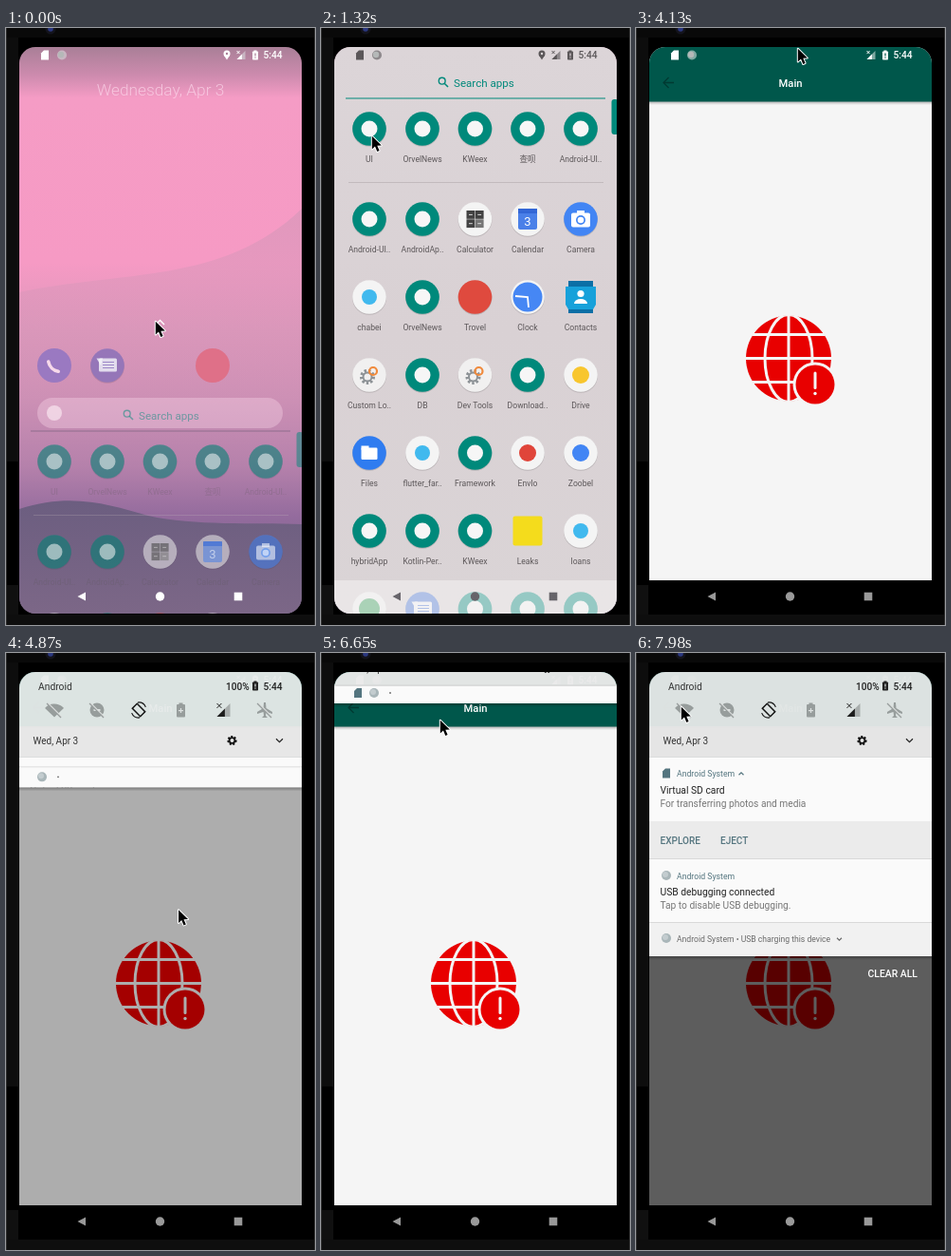
An HTML page with a canvas that plays this animation: 326x628 px, repeating every 8000 ms.

```html
<!DOCTYPE html>
<html lang="en">
<head>
<meta charset="utf-8">
<title>Phone demo</title>
<style>
html, body { margin: 0; width: 326px; height: 628px; overflow: hidden; background: #000; }
canvas { display: block; width: 326px; height: 628px; }
</style>
</head>
<body>
<canvas id="stage"></canvas>
<script>
const canvas = document.getElementById('stage');
const dpr = window.devicePixelRatio || 1;
canvas.width = 326 * dpr;
canvas.height = 628 * dpr;
const c = canvas.getContext('2d');
const LOOP = 8000, TEAL = '#00897b', GREEN = '#00574b', PAGE = '#f5f5f5', SLATE = '#54757f';

// The screen refreshes in bursts: start, end, number of steps.
const bursts = [[0, 0, 1], [150, 300, 2], [590, 1620, 8], [2070, 2940, 7], [3240, 3680, 4],
  [3980, 4130, 2], [4580, 5600, 8], [5750, 6650, 7], [6800, 7830, 8], [7980, 7980, 1]];
const ticks = bursts.flatMap(([a, b, n]) =>
  Array.from({ length: n }, (_, i) => Math.round((a + (n > 1 ? (b - a) * i / (n - 1) : 0)) / 10) * 10));

const cursorPath = [[0, 157, 308], [300, 157, 308], [590, 112, 152], [740, 87, 125], [880, 62, 115],
  [1030, 53, 113], [2070, 53, 113], [2210, 62, 128], [2940, 188, 309], [3240, 187, 290],
  [3680, 171, 28], [3980, 171, 26], [4130, 170, 21], [4580, 172, 75], [5020, 186, 370],
  [5170, 187, 398], [5460, 165, 130], [5600, 155, 45], [6200, 135, 24], [6650, 125, 70],
  [7100, 118, 320], [7240, 112, 330], [7830, 50, 57], [7980, 47, 56]];
const panelPath = [[4130, 20], [4580, 55], [5020, 186], [5170, 198], [5460, 80], [5600, 20],
  [6200, 20], [6350, 38], [6650, 53], [7100, 164], [7390, 319]];
const drawerPath = [[0, 350], [150, 120], [300, 0]];
const openPath = [[1180, 0], [1320, .35], [1470, .8], [1620, 1]];
const fadePath = [[1620, 0], [2070, .27], [2210, .62], [2360, 1]];
const navPath = [[2500, .95], [2800, .6]];

function at(path, t, col = 1) {
  if (t <= path[0][0]) return path[0][col];
  const i = path.findIndex(k => k[0] >= t);
  if (i < 0) return path[path.length - 1][col];
  const a = path[i - 1], b = path[i];
  return a[col] + (b[col] - a[col]) * (t - a[0]) / (b[0] - a[0]);
}
const clamp = (v, lo, hi) => Math.max(lo, Math.min(hi, v));

function rect(x, y, w, h, fill) { c.fillStyle = fill; c.fillRect(x, y, w, h); }
function round(x, y, w, h, r, fill) {
  c.beginPath(); c.roundRect(x, y, w, h, r); c.fillStyle = fill; c.fill();
}
function disc(x, y, r, fill) {
  c.beginPath(); c.arc(x, y, r, 0, 7); c.fillStyle = fill; c.fill();
}
function poly(fill, ...p) {
  c.beginPath();
  for (let i = 0; i < p.length; i += 2) c.lineTo(p[i], p[i + 1]);
  c.closePath(); c.fillStyle = fill; c.fill();
}
function line(color, w, ...p) {
  c.beginPath();
  for (let i = 0; i < p.length; i += 2) c.lineTo(p[i], p[i + 1]);
  c.strokeStyle = color; c.lineWidth = w; c.stroke();
}
function ring(x, y, rx, ry, color, w) {
  c.beginPath(); c.ellipse(x, y, rx, ry, 0, 0, 7); c.strokeStyle = color; c.lineWidth = w; c.stroke();
}
// y is the vertical middle of the capitals
function text(s, x, y, size, color, align = 'left', weight = 400) {
  c.font = `${weight} ${size}px Roboto, "Noto Sans CJK SC", "Noto Sans CJK", sans-serif`;
  c.textAlign = align; c.fillStyle = color; c.fillText(s, x, y + size * .355);
}
function fade(stops, y0, y1) {
  const g = c.createLinearGradient(0, y0, 0, y1);
  stops.forEach(([p, col]) => g.addColorStop(p, col));
  return g;
}
function layer(alpha, fn) { c.save(); c.globalAlpha *= alpha; fn(); c.restore(); }

function sdCard(x, y, color) { poly(color, x - 4, y - 2, x - 1, y - 5, x + 4, y - 5, x + 4, y + 5, x - 4, y + 5); }
function debugDot(x, y) { disc(x, y, 5, '#a9b6b9'); disc(x - 1, y - 1, 3, '#c3cccf'); }
function battery(x, y, color, bolt) {
  rect(x - 1.5, y - 5, 3, 1.5, color);
  round(x - 3, y - 4, 6, 9, .8, color);
  rect(x - .6, y - 2, 1.2, 3, bolt); rect(x - .6, y + 2, 1.2, 1.2, bolt);
}
function signal(x, y, s, color, dim) {
  poly(dim, x - s, y + s, x + s, y + s, x + s, y - s);
  poly(color, x - s, y + s, x + s * .2, y + s, x + s * .2, y - s * .2);
  line(color, 1, x - s, y - s, x - s * .3, y - s * .3);
  line(color, 1, x - s * .3, y - s, x - s, y - s * .3);
}
function statusBar(color, dim, bolt, pin) {
  sdCard(41, 28.5, color);
  disc(59, 28.5, 5, dim); disc(58, 28, 3.2, '#b5b8b8');
  if (pin) {
    disc(233, 27, 3.5, color);
    poly(color, 229.8, 28.5, 236.2, 28.5, 233, 33.5);
    disc(233, 27, 1.2, bolt);
  }
  signal(248, 28.5, 4.5, color, dim);
  battery(263, 28.5, color, bolt);
  text('5:44', 271.5, 28.5, 10.2, color, 'left', 500);
}
function navKeys(color) {
  poly(color, 75.5, 598, 84, 593.5, 84, 602.5);
  disc(162.5, 598, 4.7, color);
  rect(240.7, 593.7, 8.6, 8.6, color);
}
function magnifier(x, y, color) {
  ring(x - 1.3, y - 1.3, 3.4, 3.4, color, 1.4);
  line(color, 1.6, x + 1.2, y + 1.2, x + 5, y + 5);
}

function plate(x, y, color) {
  disc(x, y + .8, 18, 'rgba(0,0,0,.14)');
  disc(x, y, 17.8, color);
}
const dotted = (base, dot, r) => (x, y) => { plate(x, y, base); disc(x, y, r, dot); };
function gear(x, y) {
  plate(x, y, '#f1f0f0');
  c.setLineDash([2.4, 2]); ring(x - 2, y + 2, 6.5, 6.5, '#8d9296', 3); c.setLineDash([]);
  ring(x - 2, y + 2, 4.5, 4.5, '#8d9296', 2);
  ring(x + 4, y - 4, 4, 4, '#f08a3c', 2.2);
}
function bubble(x, y, color, ink) {
  plate(x, y, color);
  round(x - 9, y - 7.5, 19, 14, 1.5, '#f5f5fa');
  poly('#f5f5fa', x - 11.5, y - 7.5, x - 5, y - 7.5, x - 7, y);
  for (const d of [-3.5, -.5, 2.5]) line(ink, 1.2, x - 5, y + d, x + 7, y + d);
}
const icons = {
  app: dotted(TEAL, '#f6f6f6', 8.5),
  blue: dotted('#f4f4f4', '#41b9ee', 8),
  web: (x, y) => plate(x, y, '#df4a3e'),
  vault: dotted('#f4f4f4', '#f8c62e', 9),
  mail: dotted('#f4f4f4', '#e0453a', 9),
  find: dotted('#f4f4f4', '#4285f4', 9),
  map: dotted('#f4f4f4', '#34a25a', 11),
  leak: (x, y) => round(x - 15.5, y - 15.5, 31, 31, 2, '#f4dc1c'),
  gear,
  chat: (x, y) => bubble(x, y, '#4a77d8', '#4a77d8'),
  calc(x, y) {
    plate(x, y, '#f4f4f4');
    for (const [i, j] of [[0, 0], [1, 0], [0, 1], [1, 1]]) {
      const px = x - 9 + i * 9.3, py = y - 9 + j * 9.3;
      rect(px, py, 8.8, 8.8, i && j ? '#757575' : '#424242');
      line('#ddd', 1, px + 2.5, py + 4.4, px + 6.3, py + 4.4);
    }
  },
  cal(x, y) {
    plate(x, y, '#f4f4f4');
    round(x - 10, y - 11, 20, 22, 2, '#4a80e8');
    rect(x - 10, y - 11, 20, 5, '#3367d6');
    text('3', x, y + 2, 13, '#fff', 'center');
  },
  cam(x, y) {
    plate(x, y, '#4285f4');
    round(x - 10, y - 6.5, 20, 15, 2, '#fff');
    rect(x - 4, y - 9, 8, 4, '#fff');
    disc(x, y + 1, 5, '#4285f4'); disc(x, y + 1, 3.3, '#fff');
  },
  clock(x, y) {
    plate(x, y, '#f4f4f4'); disc(x, y, 15.5, '#4687f4');
    line('#fff', 1.8, x - 13, y - 1, x, y, x + 1, y + 11);
  },
  card(x, y) {
    rect(x - 13, y - 17, 26, 34, '#0b6fa6');
    poly('#17a1da', x - 16, y - 11, x + 16, y - 11, x + 16, y + 8, x + 13, y + 13, x - 13, y + 13, x - 16, y + 8);
    disc(x, y - 3.5, 3.6, '#fff');
    c.beginPath(); c.ellipse(x, y + 7, 7, 5, 0, Math.PI, 0); c.fillStyle = '#fff'; c.fill();
  },
  files(x, y) {
    plate(x, y, '#2f7cf0');
    rect(x - 8.5, y - 7.5, 8, 4, '#fff'); round(x - 8.5, y - 5.5, 17, 12.5, 1.2, '#fff');
  }
};

const cols = [51, 107, 162.5, 218, 274];
const rows = [
  [106, 'app UI', 'app OrvelNews', 'app KWeex', 'app 查呗', 'app Android-UI..'],
  [201, 'app Android-UI..', 'app AndroidAp..', 'calc Calculator', 'cal Calendar', 'cam Camera'],
  [283, 'blue chabei', 'app OrvelNews', 'web Trovel', 'clock Clock', 'card Contacts'],
  [365, 'gear Custom Lo..', 'app DB', 'gear Dev Tools', 'app Download..', 'vault Drive'],
  [447, 'files Files', 'blue flutter_far..', 'app Framework', 'mail Envlo', 'find Zoobel'],
  [529, 'app hybridApp', 'app Kotlin-Per..', 'app KWeex', 'leak Leaks', 'blue loans'],
  [611, 'map', 'chat', 'app', 'app', 'app']
];

function wallpaper() {
  rect(14, 20, 298, 596, fade([[0, '#a97f97'], [.05, '#cd8bae'], [.09, '#f59cc5'], [.38, '#f69ac4'],
    [.5, '#dd97bb'], [.62, '#cd90b5'], [.74, '#b581ab'], [.83, '#936b9d'], [1, '#74637f']], 20, 616));
  c.beginPath(); c.moveTo(14, 278);
  c.bezierCurveTo(120, 255, 230, 270, 312, 190);
  c.lineTo(312, 400); c.lineTo(14, 400);
  c.fillStyle = fade([[0, 'rgba(205,150,182,.5)'], [1, 'rgba(205,150,182,0)']], 200, 400); c.fill();
  c.beginPath(); c.moveTo(14, 506);
  c.bezierCurveTo(70, 488, 110, 502, 150, 513);
  c.bezierCurveTo(200, 524, 260, 520, 312, 522);
  c.lineTo(312, 616); c.lineTo(14, 616);
  c.fillStyle = fade([[0, '#6c5e80'], [1, '#7c6787']], 500, 616); c.fill();
}
function home(dy) {
  text('Wednesday, Apr 3', 163, 65, 17.3, 'rgba(255,226,242,.62)', 'center', 300);
  c.save(); c.translate(0, dy);
  line('#fff', 1.3, 158, 312, 162.5, 307.5, 167, 312);
  disc(51, 355, 18, '#9a79c1');
  c.beginPath(); c.arc(57.5, 348.5, 13, 1.75, 2.95); c.lineCap = 'round';
  c.strokeStyle = '#f7d9ea'; c.lineWidth = 3.6; c.stroke(); c.lineCap = 'butt';
  layer(.8, () => bubble(107, 355, '#8d73be', '#8d73be'));
  disc(218, 355, 18, '#df7088');
  round(33, 389, 259, 32, 16, 'rgba(255,225,238,.32)');
  disc(51, 405, 8, 'rgba(255,240,247,.6)');
  c.restore();
}
function drawer(dy) {
  const p = 1 - dy / 350;
  layer(p, () => rect(14, 20, 298, 596, fade([[0, '#dcd5d8'], [.5, '#d9d1d4'], [1, '#dad4d6']], 20, 616)));
  const soft = .25 + .75 * p;
  c.save(); c.translate(0, dy);
  layer(.5 + .5 * p, () => {
    magnifier(129, 57, TEAL);
    text('Search apps', 140, 57.5, 11.6, TEAL);
    rect(26, 73.5, 274, 1, p < .3 ? '#5b5268' : TEAL);
    c.beginPath(); c.roundRect(306.5, 75, 7, 37, 3); c.fillStyle = TEAL; c.fill();
  });
  layer(soft, () => rect(29, 162, 269, 1, '#c2babd'));
  for (const [y, ...apps] of rows) apps.forEach((app, i) => {
    const [kind, ...name] = app.split(' ');
    layer(.55 + .45 * p, () => icons[kind](cols[i], y));
    layer(soft, () => text(name.join(' '), cols[i], y + 32, 8.6, '#5c5759', 'center'));
  });
  c.restore();
  layer(p, () => rect(14, 581, 298, 35, 'rgba(243,240,241,.62)'));
  const dark = p > .6;
  statusBar(dark ? '#5b5759' : '#fff', dark ? '#8d888b' : '#c9b6c2', dark ? '#dcd5d8' : '#a97f97', true);
  navKeys(dark ? '#67646a' : '#fff');
}

function globe() {
  disc(161, 347.5, 45, '#e80000');
  c.save();
  c.beginPath(); c.arc(161, 347.5, 45.5, 0, 7); c.clip();
  line(PAGE, 3, 161, 300, 161, 395);
  for (const y of [322.5, 347.5, 372.5]) line(PAGE, 3, 114, y, 208, y);
  ring(161, 347.5, 25, 46, PAGE, 3);
  c.restore();
  disc(189, 375, 23.5, PAGE);
  disc(189, 375, 20.5, '#e80000');
  c.lineCap = 'round'; line(PAGE, 3, 189, 363, 189, 378.5); c.lineCap = 'butt';
  disc(189, 384.5, 1.7, PAGE);
}
function appPage(t) {
  rect(14, 20, 298, 561, PAGE);
  rect(14, 77, 298, 4, fade([[0, 'rgba(0,0,0,.3)'], [1, 'rgba(0,0,0,0)']], 77, 81));
  rect(14, 37, 298, 40.5, GREEN);
  line('#003a32', 1.3, 40, 57.5, 29, 57.5);
  line('#003a32', 1.3, 34.5, 52, 29, 57.5, 34.5, 63);
  text('Main', 163, 58, 11.2, '#fff', 'center', 500);
  globe();
  layer(1 - at(fadePath, t), () => rect(14, 37, 298, 544, PAGE));
  rect(14, 20, 298, 17, GREEN);
  statusBar('#fff', '#7fa9a2', GREEN, t < 2650);
  rect(14, 581, 298, 35, '#000');
  const v = Math.round(255 * at(navPath, t));
  navKeys(`rgb(${v},${v},${v})`);
}

function quickTiles() {
  const y = 60, off = '#979d9c', slash = '#dce0df';
  const strike = x => { line(slash, 1.5, x - 7, y - 7.5, x + 8, y + 7.5); line(off, 1.3, x - 8, y - 7, x + 7, y + 8); };
  c.beginPath(); c.moveTo(51, y + 7.5); c.arc(51, y + 7, 13.5, -2.4, -.74); c.closePath();
  c.fillStyle = off; c.fill(); strike(51);
  disc(96, y, 7.5, off); rect(92.5, y - 1, 7, 2, slash); strike(96);
  c.save(); c.translate(140, y); c.rotate(-.78);
  c.strokeStyle = '#151515'; c.lineWidth = 1.5; c.strokeRect(-3.5, -6, 7, 12); c.restore();
  for (const a of [-1.7, 1.44]) {
    c.beginPath(); c.arc(140, y, 8, a, a + 1.3); c.strokeStyle = '#151515'; c.lineWidth = 1.2; c.stroke();
  }
  rect(182.5, y - 7.5, 4, 2, off); round(180, y - 6, 9, 13.5, 1, off);
  rect(182, y, 5, 1.2, slash); rect(183.9, y - 2, 1.2, 5, slash);
  signal(229.5, y, 7, '#1c1c1c', '#a8adac');
  poly(off, 272, y - 8, 274, y - 8, 274.5, y - 2, 281, y + 2, 281, y + 4, 274.5, y + 2, 274, y + 6,
    276, y + 8, 270, y + 8, 272, y + 6, 271.5, y + 2, 265, y + 4, 265, y + 2, 271.5, y - 2);
  strike(273);
}
function chevron(x, y, s, up, color) {
  const d = up ? -s / 2 : s / 2;
  line(color, 1.2, x - s, y - d, x, y + d, x + s, y - d);
}
function panelHeader() {
  rect(14, -60, 298, 137, 'rgba(234,238,237,.94)');
  rect(14, 77, 298, 33, 'rgba(234,234,234,.97)');
  text('Android', 34, 35, 10.3, '#333');
  text('100%', 232, 35, 10.1, '#222', 'left', 500);
  battery(263, 34.5, '#222', '#dce0df');
  text('5:44', 271.5, 35, 10.2, '#222', 'left', 500);
  quickTiles();
  text('Wed, Apr 3', 28.5, 92.5, 10, '#333');
  c.setLineDash([2, 1.6]); ring(238.5, 92, 4.2, 4.2, '#111', 1.8); c.setLineDash([]);
  ring(238.5, 92, 2.9, 2.9, '#111', 1.8);
  chevron(288.5, 92, 3.5, false, '#222');
  rect(14, 109.5, 298, 1, '#d2d4d4');
}
function notifications() {
  rect(14, 110, 298, 209, '#fafafa');
  sdCard(32, 126.5, SLATE);
  text('Android System', 43, 127, 8.7, SLATE);
  chevron(111, 127, 2.5, true, SLATE);
  text('Virtual SD card', 25.5, 144, 10.3, '#222');
  text('For transferring photos and media', 25.5, 158, 10.2, '#777');
  rect(14, 177, 298, 39.5, '#ebebeb');
  text('EXPLORE', 25.5, 197, 10, SLATE, 'left', 500);
  text('EJECT', 89, 197, 10, SLATE, 'left', 500);
  rect(14, 216, 298, 1, '#d9d9d9');
  debugDot(32, 234);
  text('Android System', 43, 234.5, 8.7, SLATE);
  text('USB debugging connected', 25.5, 251.5, 10.3, '#222');
  text('Tap to disable USB debugging.', 25.5, 265.5, 10.2, '#777');
  rect(14, 283, 298, 36, '#f1f1f1');
  rect(14, 283, 298, 1, '#d9d9d9');
  debugDot(32, 300);
  text('Android System • USB charging this device', 43, 301, 8.6, '#6a6a6a');
  chevron(214.5, 301, 2.5, false, '#6a6a6a');
}
function panel(b) {
  if (b <= 21) return;
  const shift = Math.min(0, b - 129), full = b > 310;
  rect(14, 20, 298, 561, `rgba(0,0,0,${clamp((b - 60) / 276, 0, .62)})`);
  if (full) text('CLEAR ALL', 297, 337, 10.4, '#fff', 'right', 500);
  rect(14, b, 298, 4, fade([[0, 'rgba(0,0,0,.3)'], [1, 'rgba(0,0,0,0)']], b, b + 4));
  c.save();
  c.beginPath(); c.rect(14, 20, 298, b - 20); c.clip();
  c.save();
  c.translate(0, shift);
  panelHeader();
  notifications();
  c.restore();
  if (!full) {
    const top = Math.max(b - 22, 110 + shift), y = b - 11;
    rect(14, top, 298, b - top, '#fafafa');
    rect(14, top, 298, 1, '#dcdcdc');
    const x = b < 140 ? 56 : 38;
    if (b < 140) sdCard(39, y, SLATE);
    debugDot(x, y);
    disc(x + 17, y, .9, '#666');
  }
  c.restore();
}

function bezel() {
  rect(0, 0, 326, 628, '#000');
  rect(1, 0, 12, 456, '#0d0d0d');
  rect(0, 0, 1, 628, '#2a2a2a'); rect(325, 0, 1, 628, '#2a2a2a');
  rect(1, 586, 12, 42, '#101010');
  rect(1, 617, 324, 11, '#0e0e0e');
  rect(1, 0, 324, 10, '#090909');
  disc(47, 1, 5.5, '#14141c'); disc(47, 1, 2.8, '#2b3880');
}
function cursor(x, y) {
  c.save(); c.translate(x, y);
  c.beginPath();
  for (const [px, py] of [[.8, .8], [.8, 14.5], [4, 11.6], [6.3, 17], [8.6, 16], [6.3, 10.8], [10.8, 10.6]]) c.lineTo(px, py);
  c.closePath();
  c.lineJoin = 'round'; c.strokeStyle = '#fff'; c.lineWidth = 2; c.stroke();
  c.fillStyle = '#000'; c.fill();
  c.restore();
}

function draw(now) {
  const clock = now % LOOP;
  const t = ticks.filter(k => k <= clock).pop();
  c.setTransform(dpr, 0, 0, dpr, 0, 0);
  bezel();
  c.save();
  c.beginPath(); c.roundRect(14, 20, 298, 596, 17); c.clip();
  const open = at(openPath, t);
  if (open < 1) {
    const dy = at(drawerPath, t);
    wallpaper();
    layer(dy / 350, () => home((dy - 350) * .3));
    drawer(dy);
  }
  if (open > 0) {
    const mix = (a, b) => a + (b - a) * open;
    c.save();
    c.beginPath(); c.rect(mix(33, 14), mix(88, 20), mix(36, 298), mix(36, 596)); c.clip();
    layer(Math.min(1, open * 2), () => appPage(t));
    c.restore();
  }
  panel(at(panelPath, t));
  c.restore();
  cursor(at(cursorPath, t), at(cursorPath, t, 2));
}

const start = performance.now();
function loop() {
  draw(performance.now() - start);
  requestAnimationFrame(loop);
}
loop();
</script>
</body>
</html>
```
